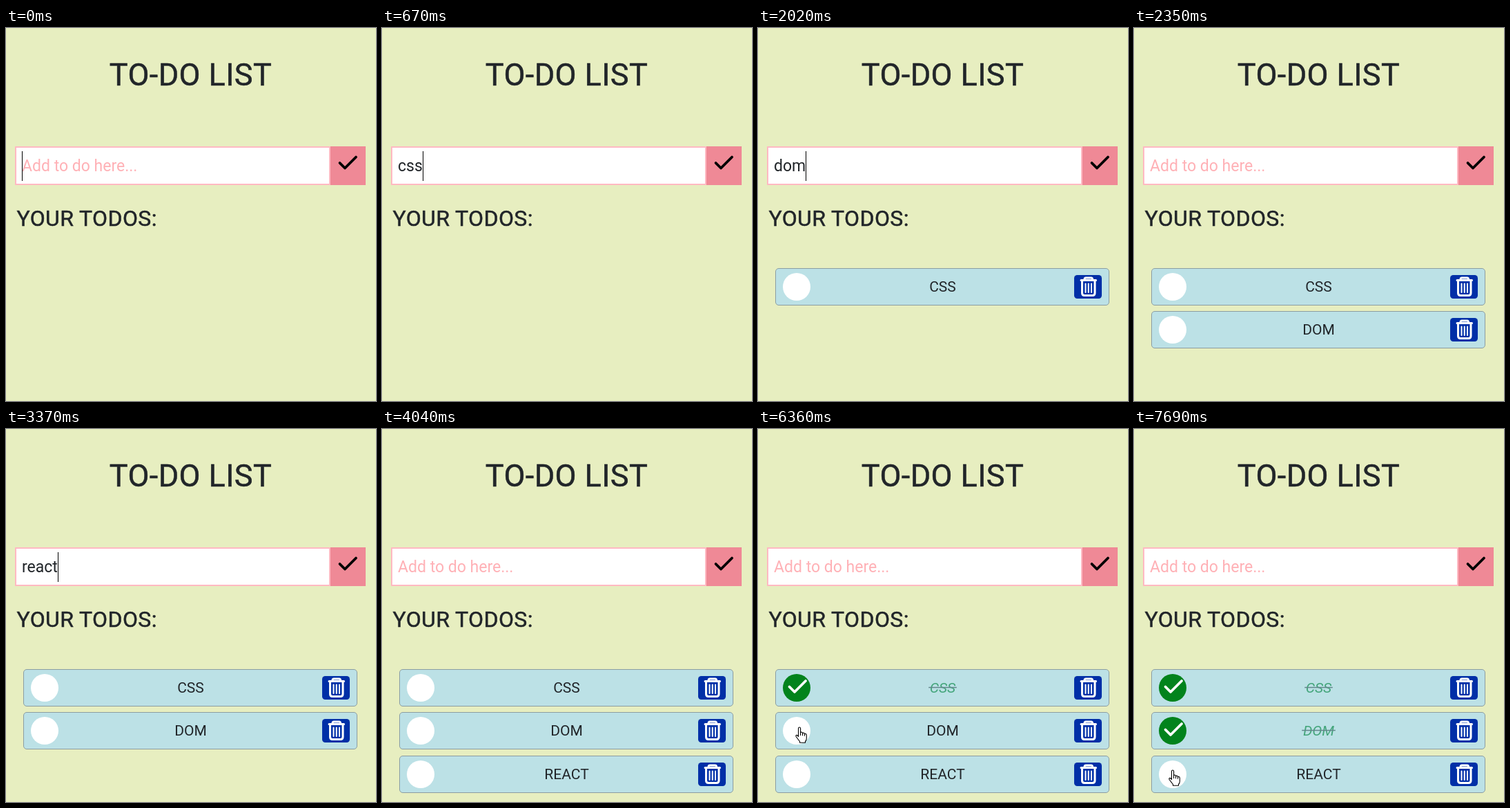
These frames come from a looping animation (536 by 539 pixels, 8000 ms). An HTML page:

```html
<!DOCTYPE html>
<html lang="en">
<head>
<meta charset="utf-8">
<title>To-do list</title>
<style>
  html, body { margin: 0; width: 100%; height: 100%; overflow: hidden; background: #e7eec0; }
  svg { display: block; width: 100vw; height: 100vh; }
  text { font-family: Roboto, sans-serif; fill: #212529; white-space: pre; }
  .title, .subtitle { stroke: #212529; stroke-width: .5; stroke-linejoin: round; letter-spacing: .4px; }
  .title { font-size: 45px; text-anchor: middle; }
  .subtitle { font-size: 32px; }
  .entry { font-size: 23px; }
  .hint { fill: #ffb1b6; }
  .label { font-size: 21px; text-anchor: middle; }
  .line { fill: none; stroke-linecap: round; stroke-linejoin: round; }
  .row > .box { fill: #bce1e6; stroke: #8c9da1; }
  .row .dot { fill: #fff; }
  .row .tick, .row .strike { visibility: hidden; }
  .done .dot { fill: #02831c; }
  .done .tick, .done .strike { visibility: visible; }
  .done .label { fill: #45a67c; font-style: italic; }
</style>
</head>
<body>
<svg viewBox="0 0 536 539">
  <defs>
    <g id="trash">
      <rect width="40" height="34" rx="4.5" fill="#002fa7"/>
      <g class="line" stroke="#fff" stroke-width="3">
        <path d="M10 7.5H31.5M15 7V6Q15 4 17 4H24.5Q26.5 4 26.5 6V7M11.5 8V26Q11.5 29.5 15 29.5H26.5Q30 29.5 30 26V8"/>
        <path stroke-width="2" d="M16.5 12.5V25M20.75 12.5V25M25 12.5V25"/>
      </g>
    </g>
    <path id="tick" class="line" stroke-width="3.8" d="M0 8.5L7.5 16L23.5 0"/>
  </defs>
  <rect width="536" height="539" fill="#e7eec0"/>
  <text class="title" x="267.5" y="82.5">TO-DO LIST</text>
  <rect x="14" y="172" width="455" height="54" fill="#fff" stroke="#ffb9c2" stroke-width="2"/>
  <rect x="470" y="171" width="51" height="56" fill="#ef8996"/>
  <use href="#tick" x="483.5" y="186.5" stroke="#000"/>
  <text class="entry hint" id="hint" x="23" y="207">Add to do here...</text>
  <text class="entry" id="typed" x="23" y="207"></text>
  <rect id="caret" y="178" width="1" height="43"/>
  <text class="subtitle" x="15.5" y="286">YOUR TODOS:</text>
  <g id="rows"></g>
  <g id="hand" class="line" stroke="#000" stroke-width="1.1">
    <path fill="#fff" d="M4.5 14.5V2.8Q4.5 1 6 1T7.6 2.8V9Q7.8 7.8 9.2 8Q10.6 8.2 10.6 10Q11 8.8 12.2 9Q13.5 9.3 13.5 11Q14 10 15 10.4Q16.3 10.8 16.3 12.5V17Q16.3 20 14.5 21.5V23.3H6.5V21.5Q4 18.5 1.2 14.5Q.3 13 1.6 12.4Q3 12 4.5 14.5Z"/>
    <path d="M7.6 9V12.5M10.6 10V12.8M13.5 11V13.2"/>
  </g>
</svg>
<script>
  const LOOP = 8000;
  const ROW_TOP = 346.8, ROW_PITCH = 62.4;
  const byId = id => document.getElementById(id);
  const [hint, typed, caret, rowsBox, hand] = ['hint', 'typed', 'caret', 'rows', 'hand'].map(byId);

  rowsBox.innerHTML = ['CSS', 'DOM', 'REACT'].map((name, i) => `
    <g class="row" transform="translate(25 ${Math.round(ROW_TOP + i * ROW_PITCH)})">
      <rect class="box" x=".5" y=".5" width="483" height="53" rx="4.5"/>
      <circle class="dot" cx="31" cy="27" r="20"/>
      <use class="tick" href="#tick" x="20.5" y="17" stroke="#fff"/>
      <text class="label" x="242.5" y="34">${name}</text>
      <path class="strike" stroke="#62868a" stroke-width="1.5"/>
      <use href="#trash" x="433" y="10"/>
    </g>`).join('');
  const rows = [...rowsBox.children];

  for (const row of rows) {
    const half = row.querySelector('.label').getComputedTextLength() / 2 + 1;
    row.querySelector('.strike').setAttribute('d', `M${242.5 - half} 26.5h${half * 2}`);
  }

  // Each step lists only what changes from the one before.
  const steps = [
    { at: 0, text: '', caret: true, count: 0, done: 0, hand: null },
    { at: 370, text: 'c' },
    { at: 670, text: 'css' },
    { at: 1020, text: '', count: 1 },
    { at: 1350, text: 'd' },
    { at: 1680, text: 'do' },
    { at: 2020, text: 'dom' },
    { at: 2350, text: '', count: 2, caret: false },
    { at: 2680, text: 're', caret: true },
    { at: 3010, text: 'rea' },
    { at: 3370, text: 'react' },
    { at: 4040, text: '', count: 3, caret: false },
    { at: 4370, caret: true },
    { at: 5040, caret: false },
    { at: 5370, caret: true, hand: [245, 497] },
    { at: 5700, hand: [74, 389] },
    { at: 6030, caret: false, hand: [29, 368] },
    { at: 6360, done: 1, hand: [54, 430] },
    { at: 6700, hand: [54, 433] },
    { at: 7030, hand: [50, 421] },
    { at: 7360, done: 2, hand: [56, 445] },
    { at: 7690, hand: [50, 492] }
  ];
  const states = [];
  for (const step of steps) states.push({ ...states.at(-1), ...step });

  const show = (node, on) => node.setAttribute('visibility', on ? 'visible' : 'hidden');

  function draw(state) {
    typed.textContent = state.text;
    show(hint, !state.text);
    show(caret, state.caret);
    caret.setAttribute('x', 23 + (state.text ? Math.round(typed.getComputedTextLength()) : 0));
    rows.forEach((row, i) => {
      row.style.display = i < state.count ? '' : 'none';
      row.classList.toggle('done', i < state.done);
    });
    show(hand, state.hand);
    if (state.hand) hand.setAttribute('transform', `translate(${state.hand})`);
  }

  let current;
  const start = performance.now();
  function tick() {
    const time = (performance.now() - start) % LOOP;
    const state = states.findLast(s => s.at <= time);
    if (state !== current) draw(current = state);
    requestAnimationFrame(tick);
  }
  tick();
</script>
</body>
</html>
```
